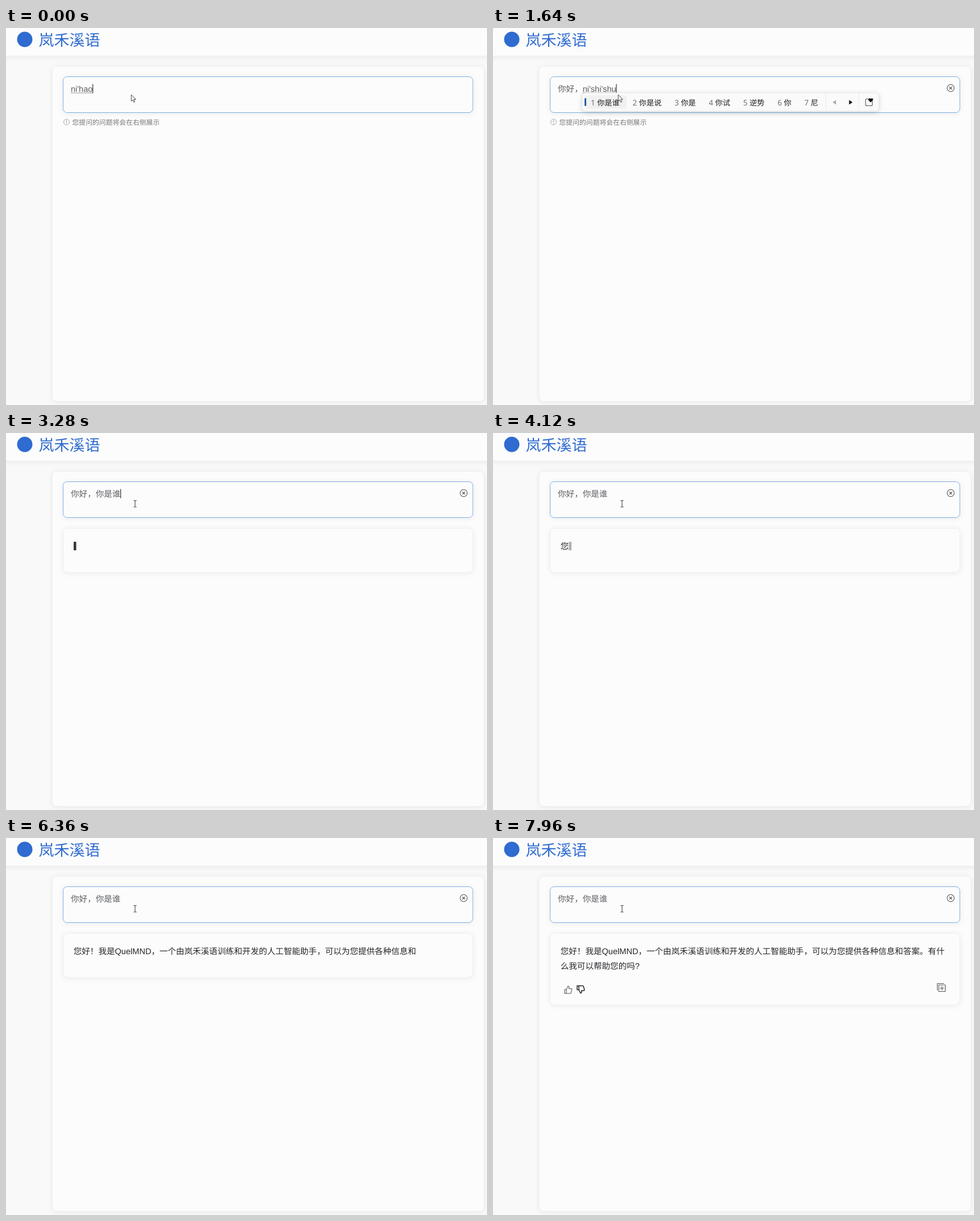
Animation, 846 px wide and 662 px high, one loop 8 s. Source, as an HTML page:

```html
<!DOCTYPE html>
<html lang="zh-CN">
<head>
<meta charset="utf-8">
<title>Chat demo</title>
<style>
  html, body { margin: 0; width: 100%; height: 100%; overflow: hidden; background: #f9f9f9; }
  svg { display: block; width: 846px; height: 662px; }
  text { font: 14.57px "Liberation Sans", "Noto Sans CJK SC", "Noto Sans CJK", sans-serif; text-rendering: geometricPrecision; white-space: pre; }
  .panel { fill: #fcfcfc; stroke: #f1f1f1; filter: drop-shadow(0 1px 5px rgba(0,0,0,.07)); }
  .icon { fill: none; stroke: #555; stroke-width: 1.1; stroke-linejoin: round; stroke-linecap: round; }
  .title { font-size: 27px; font-weight: 500; fill: #2f6bd0; }
  .hint { font-size: 11.84px; fill: #777; }
  #typed { fill: #5c5e62; }
  .answer { fill: #25272b; }
  #popup text { font-size: 13.2px; fill: #1c1c1c; }
  #popup .num { font-family: "Open Sans", sans-serif; font-size: 13.5px; fill: #666; }
</style>
</head>
<body>
<svg viewBox="0 0 846 662">
  <rect x="-10" y="-10" width="866" height="59" class="panel"/>
  <circle cx="33" cy="20" r="13.5" fill="#2f6bd0"/>
  <text x="57.5" y="30.5" class="title">岚禾溪语</text>

  <rect x="81.5" y="67.5" width="759" height="588" rx="8" class="panel"/>
  <rect x="100.5" y="85.5" width="720.5" height="63" rx="7" class="panel" style="stroke:#7db1e6"/>
  <text id="typed" x="114" y="112"></text>
  <path id="underline" stroke="#777" stroke-width=".8"/>
  <path id="caret" stroke="#222" stroke-width="1.1"/>
  <g id="clear" class="icon">
    <circle cx="805" cy="105.5" r="6.2"/>
    <path d="M803 103.500l4 4m0-4l-4 4"/>
  </g>

  <g id="hint">
    <circle cx="106.500" cy="165" r="5" fill="none" stroke="#999" stroke-width=".9"/>
    <path d="M106.500 162v3.800m0 1.200v1" stroke="#888"/>
    <text x="116.500" y="170" class="hint">您提问的问题将会在右侧展示</text>
  </g>

  <g id="reply">
    <rect id="card" x="100.500" y="167.500" width="720.500" rx="8" class="panel" style="stroke:#efeff4"/>
    <text id="line1" x="118.700" y="204" class="answer"></text>
    <text id="line2" x="118.700" y="230" class="answer"></text>
    <rect id="block" width="4.500" height="15" fill="#222"/>
  </g>
  <g id="actions" class="icon">
    <path id="thumb" d="M126 266h3v7h-3zM129 266l3-6c2 0 2 2 1.500 4.500h4c1.300 0 1.500 .8 1.200 1.700l-1.500 5.600c-.3 1-.8 1.200-1.500 1.200h-6.700"/>
    <use href="#thumb" transform="matrix(1 0 0 -1 22 532.500)" style="stroke:#222;stroke-width:1.500"/>
    <path d="M781.500 267v-11.500h11.500M784 258h11.500v11.500h-11.500zM789.700 260.500v6.500m-3.200-3.200h6.500"/>
  </g>

  <g id="popup" transform="translate(157 114)"></g>
  <path id="arrow" d="M220.300 117.200v11.300l2.600-2.400 1.800 4.300 1.900-.8-1.800-4.200h3.500z" fill="#fff" stroke="#333" stroke-width=".9"/>
  <path id="beam" d="M224.500 118.500h1.700l.8.700.8-.7h1.700M227 119v10.500M224.500 130h1.700l.8-.7.8.7h1.700" fill="none" stroke="#333"/>
</svg>
<script>
const LOOP = 8000;
const $ = id => document.getElementById(id);
const show = (id, on) => $(id).style.display = on ? "" : "none";

// time, committed text, text being composed
const typing = [
  [0, "", "ni'hao"], [40, "你好", ""], [560, "你好，", ""],
  [720, "你好，", "n"], [880, "你好，", "ni"], [1080, "你好，", "ni's"],
  [1160, "你好，", "ni'sh"], [1240, "你好，", "ni'shi"], [1400, "你好，", "ni'shi's"],
  [1480, "你好，", "ni'shi'sh"], [1560, "你好，", "ni'shi'shu"],
  [1680, "你好，", "ni'shi'shui"], [2000, "你好，你是谁", ""]
];
// time, candidate words
const candidates = [
  [0, ""], [720, "你 那 年 能 呢 女 内"], [880, "你 呢 尼 泥 拟 逆 妮"],
  [1000, "你是 你说 你扫 逆神 尼斯 你傻 你上".replace("逆神 尼斯 你傻", "逆神 你傻 尼斯")],
  [1240, "你是 你试 逆势 拟是 你使 你 尼"],
  [1400, "你是谁 你是说 你是 你试 逆势 你 尼"],
  [1680, "你是谁 你是水 你试水 你是 你试 你 尼"], [2000, ""]
];
const answer = "您好！我是QuelMND，一个由岚禾溪语训练和开发的人工智能助手，可以为您提供各种信息和答案。有什么我可以帮助您的吗?";
const WRAP = 49;
const pace = [[4000, 1], [4150, 2], [5320, 28.2], [6360, 44.5], [7320, answer.length]];
const DONE = 7400;

const current = (list, t) => list.findLast(step => step[0] <= t);

function charsAt(t) {
  if (t < pace[0][0]) return 0;
  const i = pace.findIndex(p => p[0] > t);
  if (i < 0) return answer.length;
  const [t0, n0] = pace[i - 1], [t1, n1] = pace[i];
  return Math.floor(n0 + (n1 - n0) * (t - t0) / (t1 - t0));
}

let shownWords;
function drawPopup(words) {
  if (words === shownWords) return;
  shownWords = words;
  if (!words) { $("popup").innerHTML = ""; return; }
  let x = 15, items = "", firstEnd = 0;
  words.split(" ").forEach((word, i) => {
    items += `<text class="num" x="${x}" y="21.700">${i + 1}</text><text x="${x + 11.2}" y="21.700">${word}</text>`;
    x += 13.2 * word.length + 34;
    firstEnd ||= x - 15;
  });
  const sep = x - 9.5;
  $("popup").innerHTML = `
    <rect width="${sep + 93}" height="32" rx="6" fill="#fafafa" stroke="#ececec" style="filter:drop-shadow(0 2px 4px rgba(0,0,0,.16))"/>
    <rect x="5" y="4" width="${firstEnd - 0.5}" height="24" rx="4" fill="#f1f1f1"/>
    <rect x="4" y="9" width="3" height="14" rx="1.500" fill="#1b5cab"/>${items}
    <path d="M${sep} 1v30M${sep + 58} 1v30" stroke="#e8e8e8"/>
    <path d="M${sep + 18} 12.500v8l-6-4z" fill="#aaa"/>
    <path d="M${sep + 41} 12.500v8l6-4z" fill="#111"/>
    <rect x="${sep + 70}" y="10.500" width="12" height="12" rx="2" class="icon"/>
    <path d="M${sep + 79} 17l-4-4c-1.500-2 1-5.500 4-3 3-2.500 5.500 1 4 3z" fill="#111" stroke="#fafafa" stroke-width=".6"/>`;
}

function drawInput(t) {
  const [, text, composing] = current(typing, t);
  const typed = $("typed");
  typed.textContent = text;
  const start = 114 + (text && typed.getComputedTextLength());
  typed.textContent = text + composing;
  const end = 114 + typed.getComputedTextLength();
  $("underline").setAttribute("d", composing ? `M${start} 114H${end}` : "");
  $("caret").setAttribute("d", `M${end + 0.3} 98.500v16`);
  const blinkedOff = (t - 7950 + 8 * 1050) % 1050 < 530;
  show("caret", t < 2180 || !blinkedOff);
  show("clear", text);
  drawPopup(current(candidates, t)[1]);
}

function drawReply(t) {
  const n = charsAt(t), twoLines = n > WRAP, waiting = t < 2480, done = t >= DONE;
  show("hint", t < 2280);
  show("reply", t >= 2280);
  show("actions", done);
  const bottom = waiting ? 236.5 : done ? 293 : twoLines ? 271 : 245;
  $("card").setAttribute("height", bottom - 167.5);
  $("line1").textContent = answer.slice(0, Math.min(n, WRAP));
  $("line2").textContent = answer.slice(WRAP, Math.max(n, WRAP));
  const width = n ? $(twoLines ? "line2" : "line1").getComputedTextLength() : 0;
  $("block").setAttribute("x", 119 + width);
  $("block").setAttribute("y", twoLines ? 217 : 191);
  $("block").setAttribute("opacity", waiting || done ? 0 : 0.5 - 0.5 * Math.cos((t - 60) / 700 * 2 * Math.PI));
}

function frame() {
  const t = performance.now() % LOOP;
  drawInput(t);
  drawReply(t);
  show("arrow", t < 2700);
  show("beam", t >= 2700);
  requestAnimationFrame(frame);
}
frame();
</script>
</body>
</html>
```
